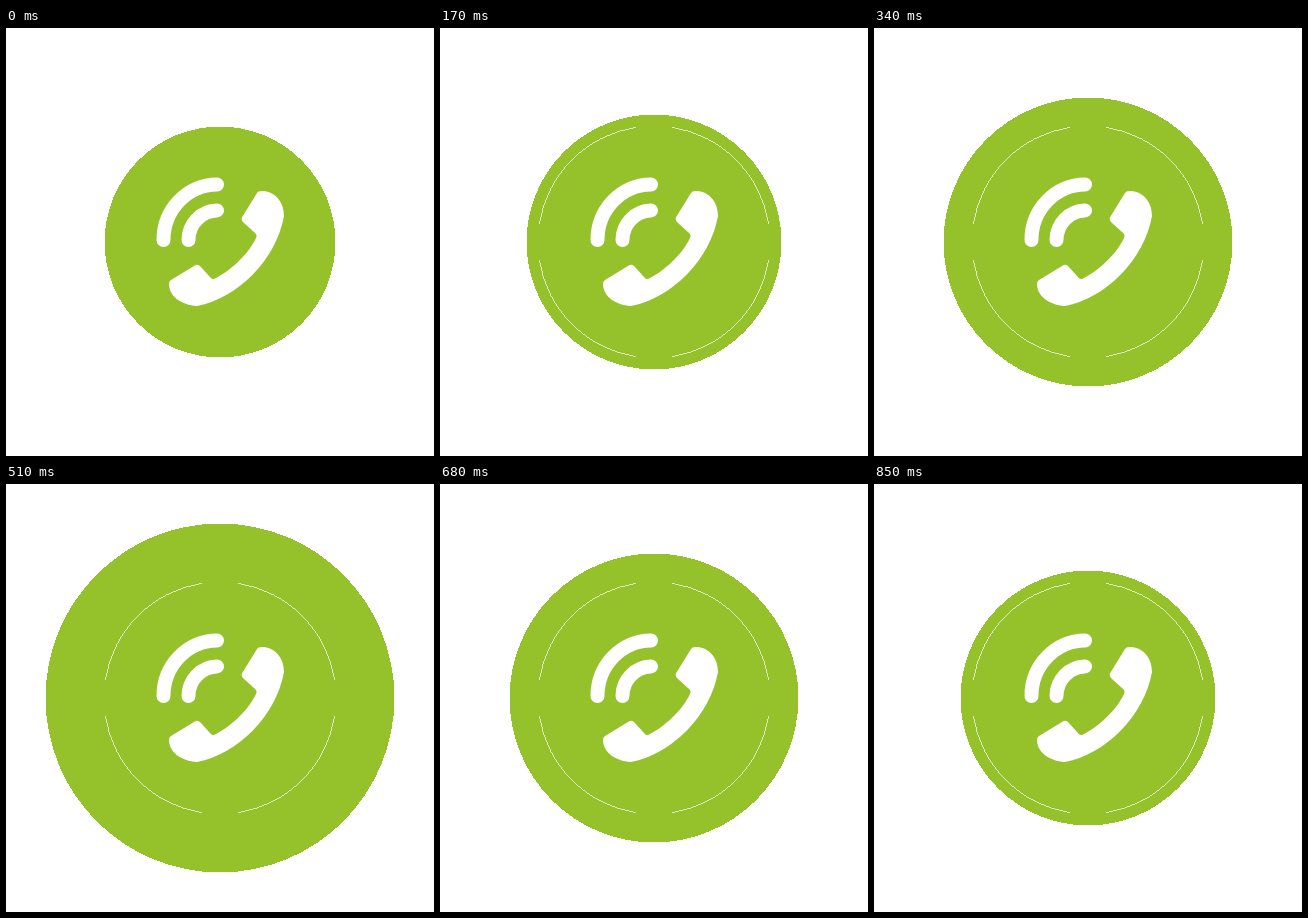
An HTML page for the animation above (1.02 s loop, 428x428 px).

```html
<!DOCTYPE html>
<html lang="en">
<head>
<meta charset="utf-8">
<title>Pulsing call button</title>
<style>
  html, body { margin: 0; height: 100%; overflow: hidden; background: #fff; }
  svg { display: block; width: 100vw; height: 100vh; }
</style>
</head>
<body>
<svg viewBox="0 0 428 428">
  <g shape-rendering="crispEdges">
    <circle id="disc" cx="214" cy="214" r="115.45" fill="#95c12b"/>
    <circle id="ring" cx="214" cy="214" r="116.1" fill="none" stroke="#fff" stroke-width=".7"
            pathLength="360" stroke-dasharray="72 18" stroke-dashoffset="-9"/>
  </g>
  <g fill="none" stroke="#fff" stroke-width="14" stroke-linecap="round">
    <path d="M157.5 212A54 55.5 0 0 1 211 156.5"/>
    <path d="M182.5 212A29 29.5 0 0 1 211 182.5"/>
  </g>
  <path fill="#fff" d="M251 165Q252 163 256 163C268 163 278 173 278 188C270 232 232 270 191 278
    C175 277 163 268 163 256Q163 253 165 252L188 238Q191 235.500 194 238L204 249Q206 252 209 250.500
    C224 243 242 227 250 210Q251.500 207 249 205L237 194Q234.500 191 236.500 188.500Z"/>
</svg>
<script>
  const STEP = 170;
  const radii = [115.45, 127.45, 144.45, 174.45, 144.45, 127.45];
  const disc = document.getElementById('disc');
  const ring = document.getElementById('ring');

  function draw() {
    const step = Math.floor(performance.now() / STEP) % radii.length;
    disc.setAttribute('r', radii[step]);
    ring.style.display = step ? '' : 'none';
    requestAnimationFrame(draw);
  }
  draw();
</script>
</body>
</html>
```
